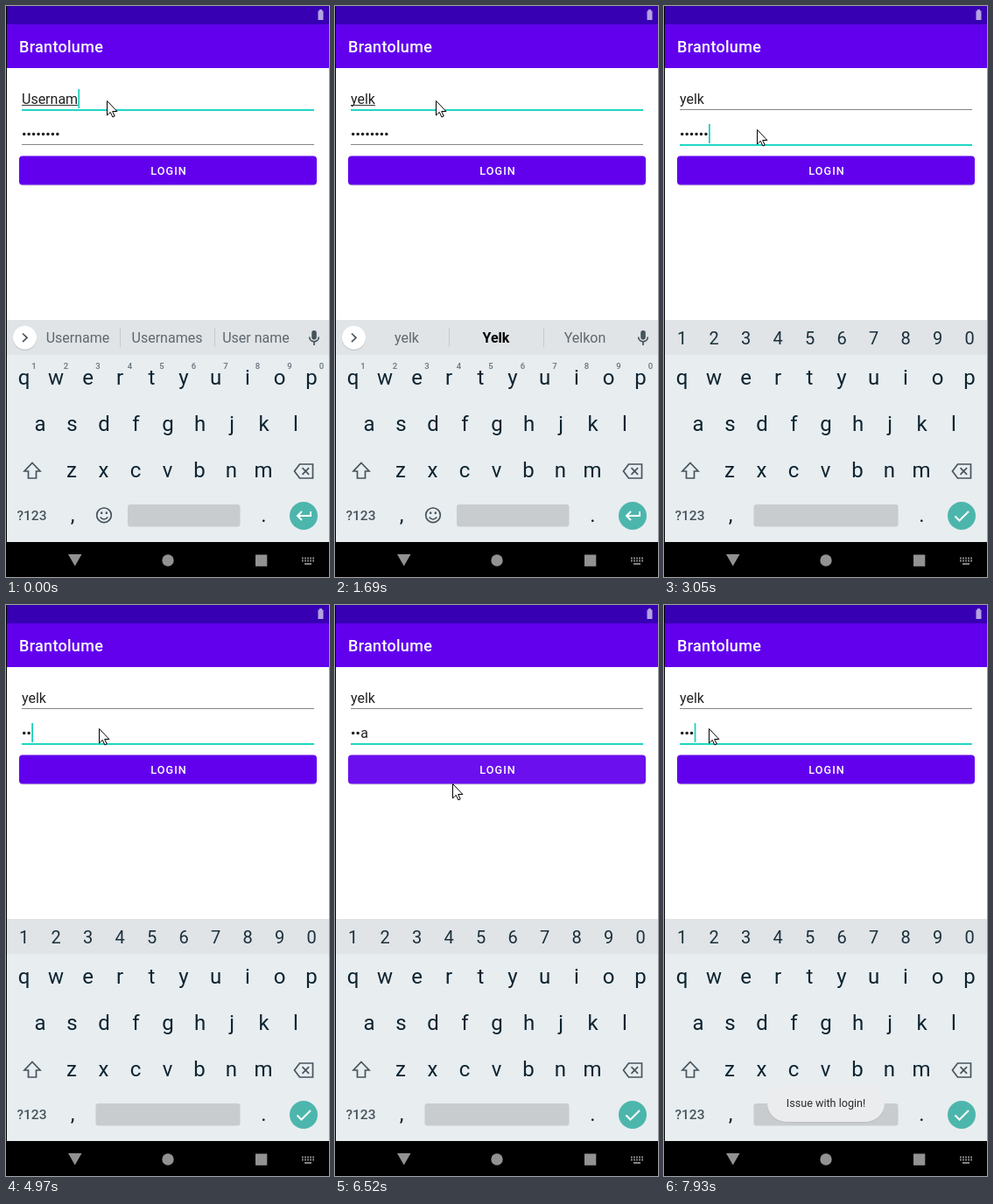
Recreate the animation shown at these times as an HTML page. Size 369 by 653 pixels, loop 8 s.

```html
<!DOCTYPE html>
<html lang="en">
<head>
<meta charset="utf-8">
<title>Login</title>
<style>
  html, body { margin: 0; width: 100%; height: 100%; overflow: hidden; background: #000; }
  svg { display: block; width: 100vw; height: 100vh; font-family: Roboto, sans-serif; }
  .mid { text-anchor: middle; }
  .key { font-size: 24px; fill: #0d2430; text-anchor: middle; }
  .num { font-size: 20px; fill: #1b303b; text-anchor: middle; }
  .hint { font-size: 9.5px; font-weight: 500; fill: #65727a; text-anchor: middle; }
  .sug { font-size: 16px; fill: #5d676d; text-anchor: middle; }
  .bold { font-weight: 700; fill: #000; }
  .field { font-size: 16px; fill: #212121; }
  .icon { fill: none; stroke: #46545c; stroke-width: 1.7; }
  .white { fill: none; stroke: #fff; stroke-width: 2; }
</style>
</head>
<body>
<svg viewBox="0 0 369 653" preserveAspectRatio="none">
  <rect width="369" height="653"/>
  <rect x="1" width="368" height="21" fill="#3700b3"/>
  <path d="M358 4h3v1.5h1.5V16h-6V5.500h1.500z" fill="#b5a3e0"/>
  <rect x="1" y="21" width="368" height="50" fill="#6200ee"/>
  <text x="15" y="53" font-size="18" font-weight="500" letter-spacing=".3" fill="#fff">Brantolume</text>
  <rect x="1" y="71" width="368" height="288" fill="#fff"/>

  <text id="user" class="field" x="18" y="112"></text>
  <rect id="compose" x="18" y="113" height="1" fill="#333"/>
  <rect id="userLine" x="18" width="334"/>
  <path id="dots" fill="none" stroke="#212121" stroke-width="3.6" stroke-linecap="round" stroke-dasharray="0 5.45"/>
  <text id="letter" class="field" y="152"></text>
  <rect id="passLine" x="18" width="334"/>
  <rect id="caret" width="1.8" height="22" fill="#1fd0bd"/>

  <rect x="15" y="172.500" width="340" height="33" rx="4" fill="#000" opacity=".16"/>
  <rect x="15" y="171.500" width="340" height="33" rx="4" fill="#6200ee"/>
  <rect id="ripple" x="15" y="171.500" width="340" height="33" rx="4" fill="#fff" opacity=".06"/>
  <text class="mid" x="186" y="193" font-size="12.600" font-weight="500" letter-spacing="1.1" fill="#fff">LOGIN</text>
  <path id="handle" d="M62.500 160l6.400 6.400a9 9 0 1 1-12.800 0z" fill="#1fd0bd"/>

  <rect x="1" y="359" width="368" height="254" fill="#e8edf0"/>
  <rect x="1" y="359" width="368" height="40" fill="#e0e4e7"/>
  <g id="keys"></g>
  <g class="icon">
    <path d="M30 522.500l9 9.500h-4.500v8h-9v-8H21z"/>
    <path d="M335.500 524h15v16h-15l-6-8zM338.500 528.200l7.600 7.600m0-7.600l-7.600 7.600"/>
  </g>
  <text class="mid" x="29.500" y="588" font-size="15.500" font-weight="500" fill="#46545c">?123</text>
  <rect id="space" y="570" height="25.500" rx="3" fill="#c8cccf"/>
  <circle cx="340" cy="583" r="16" fill="#4db6ac"/>

  <g id="textKeys">
    <g id="hints"></g>
    <circle cx="21.500" cy="380.300" r="13.700" fill="#000" opacity=".13"/>
    <circle cx="21.500" cy="379.300" r="13.500" fill="#fff"/>
    <path class="icon" d="M19 374.500l5 4.800-5 4.800"/>
    <path id="bars" d="M130.500 368v22M238.500 368v22" stroke="#c5cacd"/>
    <text class="sug" x="82" y="385"></text>
    <text class="sug" x="184" y="385"></text>
    <text class="sug" x="285.500" y="385"></text>
    <rect x="349.200" y="371" width="5.600" height="10.500" rx="2.800" fill="#46545c"/>
    <path class="icon" d="M346.700 378.500c0 7 10.600 7 10.600 0M352 384v4"/>
    <g class="icon" stroke-width="1.500">
      <circle cx="112" cy="582.300" r="8.300"/>
      <path d="M107.700 584.500q4.300 5 8.600 0" />
      <path d="M109.200 578.500v2.500m5.600-2.500v2.500" stroke-width="2.200"/>
    </g>
    <path class="white" d="M348 578v5h-15m5-5l-5 5 5 5"/>
  </g>
  <g id="passKeys">
    <path class="white" d="M332.500 583.500l5 5 10.500-10.500"/>
  </g>

  <g fill="#929292">
    <path d="M71 627h15.500l-7.750 13.500z"/>
    <circle cx="185" cy="634" r="6.700"/>
    <rect x="285" y="627.500" width="13.300" height="13.300"/>
    <path d="M338 631.500h14M338 634.500h14" stroke="#929292" stroke-width="1.800" stroke-dasharray="1.800 1.250"/>
    <path d="M341 638h8" stroke="#929292" stroke-width="1.800"/>
  </g>

  <g id="toast">
    <rect x="118" y="549.500" width="134" height="43" rx="21.500" fill="#000" opacity=".05"/>
    <rect x="118" y="548" width="134" height="43" rx="21.500" fill="#ebeced"/>
    <text class="mid" x="185" y="574" font-size="12.600" fill="#2b2b2b">Issue with login!</text>
  </g>
  <path id="mouse" d="M.5.5v16.500l3.800-3.600 2.600 5.600 2.300-1-2.500-5.500h5.200z" fill="#fff" stroke="#000"/>
</svg>
<script>
const $ = id => document.getElementById(id);
const LOOP = 8000, PITCH = 36.5, DOT = 5.45;
const FOCUS = 2080, SWAP = 2210;

// time, typed name, three suggestions
const names = [
  [0, 'Usernam', 'Username', 'Usernames', 'User name'],
  [120, 'User', 'User', 'Users', 'Username'],
  [250, 'Us', 'Us', 'Use', 'Used'],
  [370, ''],
  [800, 'y', 'y', 'you', 'yes'],
  [950, 'ye', 'ye', 'yes', 'yeah'],
  [1100, 'yel', 'yel', 'yell', 'yellow'],
  [1250, 'yelk', 'yelk', 'Yelk', 'Yelkon']
];

// time, hidden characters, visible character
const secrets = [
  [0, 8, ''], [2630, 7, ''], [3050, 6, ''], [3200, 3, ''], [3350, 0, ''],
  [4090, 0, 'a'], [4240, 1, 's'], [4380, 2, 'd'], [4520, 3, 'a'],
  [4820, 3, ''], [4970, 2, ''], [5110, 0, ''],
  [5250, 0, 's'], [5400, 1, 'd'], [5530, 2, 'a'], [7070, 3, '']
];

const blinks = [
  [0, 1], [1690, 0], [FOCUS, 1], [3790, 0], [4090, 1],
  [5980, 0], [6650, 1], [7070, 0], [7500, 1]
];

const moves = [
  [0, 115, 108], [1830, 112, 120], [1950, 106, 141],
  [5820, 106, 154], [5980, 113, 176], [6120, 120, 189], [6270, 130, 200],
  [6520, 134, 204], [6670, 146, 330], [6800, 170, 560], [6950, 200, 636],
  [7070, 250, 634], [7210, 260, 560], [7350, 235, 508], [7500, 125, 520],
  [7640, 92, 380], [7790, 60, 200], [7930, 51, 141]
];

const at = (rows, t) => rows.findLast(row => row[0] <= t);
const set = (el, attrs) => { for (const k in attrs) el.setAttribute(k, attrs[k]); };
const show = (el, on) => { el.style.display = on ? '' : 'none'; };

function row(parent, chars, x, y, cls) {
  [...chars].forEach((c, i) => {
    const el = document.createElementNS('http://www.w3.org/2000/svg', 'text');
    set(el, { x: x + i * PITCH, y, class: cls });
    el.textContent = c;
    parent.append(el);
  });
}
row($('keys'), 'qwertyuiop', 20.5, 433, 'key');
row($('keys'), 'asdfghjkl', 39, 486, 'key');
row($('keys'), 'zxcvbnm', 75, 539, 'key');
row($('keys'), ',', 76, 590, 'key');
row($('keys'), '.', 294.5, 590, 'key');
row($('hints'), '1234567890', 32, 415, 'hint');
row($('passKeys'), '1234567890', 20.5, 387, 'num');

const sugs = document.querySelectorAll('.sug');

function line(el, y, focused) {
  set(el, focused
    ? { y, height: 2, fill: '#1fd6c4' }
    : { y, height: 1, fill: '#858585' });
}

function draw(t) {
  const onPass = t >= FOCUS, passMode = t >= SWAP;
  const [, name, ...words] = at(names, t);
  $('user').textContent = name;
  const nameWidth = name ? $('user').getComputedTextLength() : 0;
  set($('compose'), { width: nameWidth });
  show($('compose'), !onPass);
  line($('userLine'), 118, !onPass);
  line($('passLine'), 158, onPass);

  sugs.forEach((el, i) => {
    el.textContent = words[i] || '';
    el.classList.toggle('bold', i === 1 && t >= 800);
  });
  show($('bars'), words.length);

  const [, count, char] = at(secrets, t);
  const end = 18.3 + count * DOT;
  set($('dots'), { d: count ? `M20.700 146.500h${count * DOT - 2}` : '' });
  $('letter').textContent = char;
  set($('letter'), { x: end });
  const charWidth = char ? $('letter').getComputedTextLength() : 0;

  set($('caret'), onPass
    ? { x: end + charWidth, y: 135 }
    : { x: 18.2 + nameWidth, y: 95 });
  show($('caret'), at(blinks, t)[1]);
  $('handle').style.opacity = t < FOCUS || t >= 2780 ? 0 : t < 2630 ? 1 : 0.5;

  show($('textKeys'), !passMode);
  show($('passKeys'), passMode);
  const left = passMode ? 102.5 : 139;
  set($('space'), { x: left, width: 267.5 - left });

  show($('ripple'), t >= 6400 && t < 6800);
  $('toast').style.opacity = t < 6800 ? 0 : t < 6950 ? 0.5 : 1;
  const [, x, y] = at(moves, t);
  set($('mouse'), { transform: `translate(${x} ${y})` });
}

const start = performance.now();
function tick() {
  draw((performance.now() - start) % LOOP);
  requestAnimationFrame(tick);
}
tick();
</script>
</body>
</html>
```
